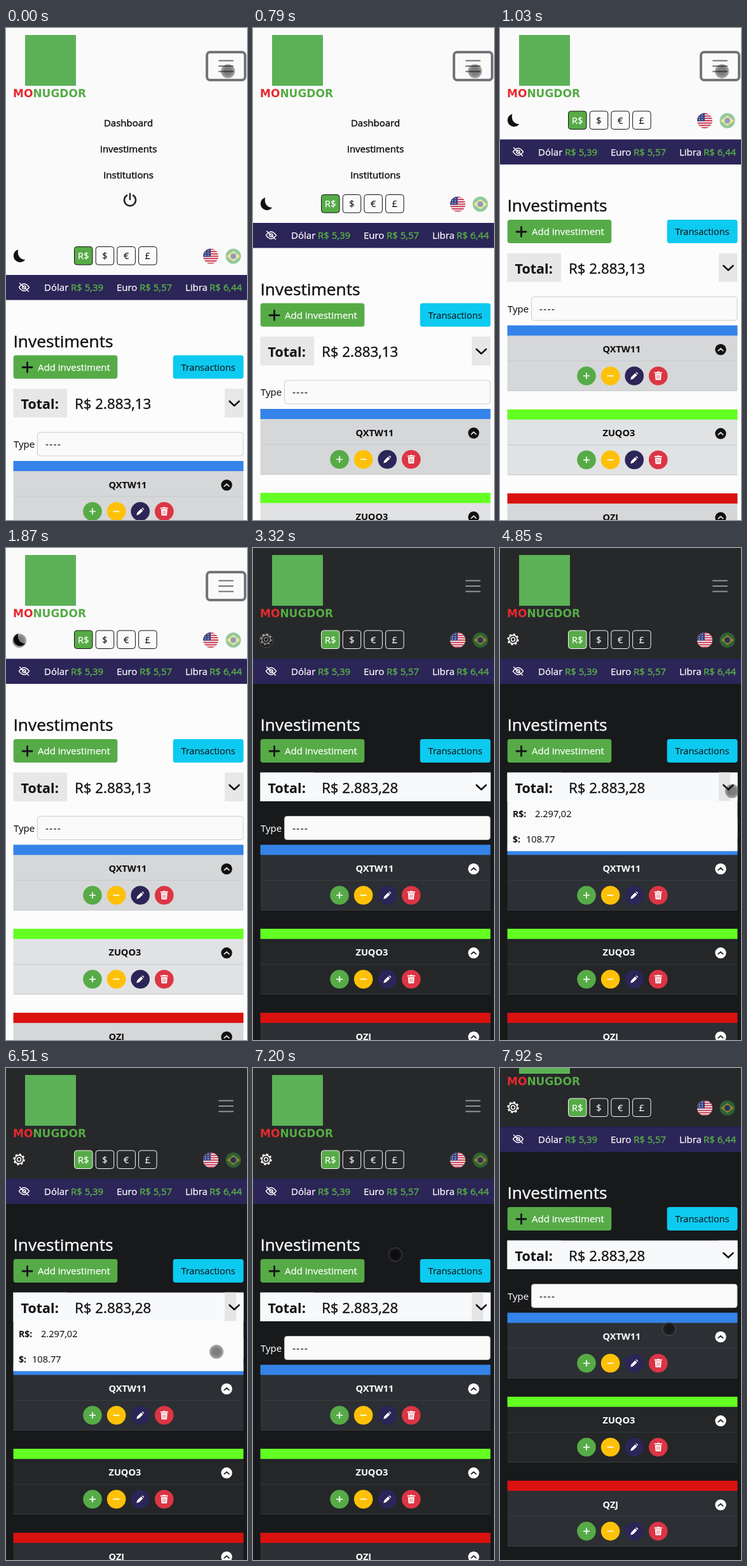
Recreate the animation shown at these times as an HTML page. Size 379 px wide and 775 px high, loop 8000 ms.

```html
<!DOCTYPE html>
<html lang="en">
<head>
<meta charset="utf-8">
<title>Wallet page</title>
<style>
html, body { margin: 0; width: 100%; height: 100%; overflow: hidden; }
svg {
  display: block; width: 379px; height: 775px;
  font: 15px "Open Sans", "Noto Sans", sans-serif;
  --bg: #fcfcfc; --nav: #fafafa; --ink: #111; --odd: #d6d7d9; --even: #e1e2e4;
  --line: #c6c8ca; --box: #e7e7e8; --amount: none; --bars: #707174; --edge: #ccc;
  --disc: #111; --mark: #e4e5e7;
  background: var(--bg);
}
svg.dark {
  --bg: #18191b; --nav: #27282a; --ink: #f8f9fa; --odd: #2c2f33; --even: #242628;
  --line: #3a3d41; --box: #f8f9fa; --amount: #f8f9fa; --bars: #939495; --edge: #bbb;
}
svg.lit { --disc: #fff; --mark: #222; }
text { --tone: var(--ink); fill: var(--tone); stroke: var(--tone); stroke-width: .1px; white-space: pre; }
.mid { text-anchor: middle; }
.med { stroke-width: .45px; }
.bold { font-weight: 700; }
.white { --tone: #fff; stroke-width: .25px; }
.black { --tone: #151618; }
.green { --tone: #56ab47; }
.stroke { fill: none; stroke-linecap: round; stroke-linejoin: round; }
.dark .light-only, svg:not(.dark) .dark-only { display: none; }
</style>
</head>
<body>
<svg id="stage" viewBox="0 0 379 775"></svg>
<script>
const GREEN = '#56ab47', NAVY = '#2c2558', YELLOW = '#ffc107', RED = '#dc3545';

const text = (x, y, s, cls = '', size = 15) =>
  `<text x="${x}" y="${y}" class="${cls}" font-size="${size}">${s}</text>`;
const rect = (x, y, w, h, fill, more = '') =>
  `<rect x="${x}" y="${y}" width="${w}" height="${h}" fill="${fill}" ${more}/>`;
const disc = (x, y, r, fill, more = '') =>
  `<circle cx="${x}" cy="${y}" r="${r}" fill="${fill}" ${more}/>`;
const line = (d, color, width, more = '') =>
  `<path class="stroke" d="${d}" stroke="${color}" stroke-width="${width}" ${more}/>`;

const header = () =>
  rect(30, 11, 80, 80, '#5cb157') +
  `<text x="11" y="108.5" style="font:bold 17px 'DejaVu Sans',sans-serif;fill:${GREEN};stroke:none"><tspan fill="#e8292e">MO</tspan>NUGDOR</text>` +
  rect(316, 38, 60, 44, 'none', 'class="light-only" rx="5" stroke="#747578" stroke-width="4"') +
  line('M335 51.5H357M335 60H357M335 68.5H357', 'var(--bars)', 2);

const menu = () =>
  ['Dashboard', 'Investiments', 'Institutions']
    .map((s, i) => text(192.5, 155 + i * 41, s, 'mid med')).join('') +
  line('M190 263.6A9 9 0 1 0 200 263.6M195 261V270', '#25262a', 2.6);

const moon = () =>
  '<path class="light-only" fill="#111" d="M19.3 134.4C17 143 22 150.5 30.2 150.2C26 155.6 19 155.6 15 151.6C9.5 146 11.5 136.6 19.3 134.4Z"/>';

const gear = () => '<g class="dark-only">' +
  disc(20.5, 144, 6.6, 'none', 'stroke="#fff" stroke-width="1.6"') +
  disc(20.5, 144, 8.2, 'none', 'stroke="#fff" stroke-width="2" stroke-dasharray="3.2 3.24"') +
  disc(20.5, 144, 3, 'none', 'stroke="#fff" stroke-width="1.5"') + '</g>';

const flags = () =>
  '<clipPath id="round"><circle cx="322" cy="145" r="12"/></clipPath><g clip-path="url(#round)">' +
  rect(310, 133, 24, 24, '#f4f0f0') +
  [0, 1, 2, 3, 4, 5, 6].map(i => rect(310, 133 + i * 3.7, 24, 1.85, '#c9304a')).join('') +
  rect(310, 133, 12, 12.9, '#3b4783') +
  [0, 1, 2, 3, 4, 5].map(i => disc(313.5 + i % 2 * 4.5, 136 + (i >> 1) * 3.7, 0.8, '#dde')).join('') +
  '</g><g opacity=".5">' + disc(357.5, 145, 12, '#2f9a45') +
  '<path d="M347 145L357.5 137L368 145L357.5 153Z" fill="#f7d32e"/>' + disc(357.5, 145, 4.5, '#24408e') + '</g>';

const currencies = () => ['R$', '$', '€', '£'].map((s, i) => {
  const x = 107.5 + i * 33.7;
  return rect(x, 130, 28.5, 28.5, i ? 'none' : GREEN, 'rx="4" stroke="var(--ink)"') +
    text(x + 14.2, 149.5, s, i ? 'mid' : 'mid white');
}).join('');

const rates = () => rect(0, 174.5, 379, 39.5, NAVY) +
  line('M20.5 194Q28.5 183 36.5 194Q28.5 205 20.5 194ZM21.5 187.5L35.5 200.5', '#fff', 1.4) +
  disc(28.5, 194, 2.6, 'none', 'stroke="#fff" stroke-width="1.4"') +
  [[60, 'Dólar', 102, '5,39'], [174, 'Euro', 210, '5,57'], [282, 'Libra', 320, '6,44']]
    .map(([x, s, vx, v]) => text(x, 199.5, s, 'white') + text(vx, 199.5, 'R$ ' + v, 'green med')).join('');

const actions = () => text(11.5, 288, 'Investiments', 'med', 26.3) +
  rect(11.7, 301, 163.6, 37, GREEN, 'rx="4"') +
  line('M26 320H41M33.5 312.5V327.5', '#151618', 2.8) + text(50, 325, 'Add investiment', 'white') +
  rect(262.7, 301, 110.8, 37, '#0dcaf0', 'rx="4"') + text(318, 325, 'Transactions', 'mid black', 14.5);

const total = () => rect(11.5, 353.7, 362, 45.3, 'var(--amount)') +
  rect(11.5, 353.7, 84.5, 45.3, 'var(--box)') + rect(344, 353.7, 29.5, 45.3, 'var(--box)') +
  `<g id="hover">${rect(344, 353.7, 18, 45.3, '#e5e5e6')}</g>` +
  text(23.5, 385.5, 'Total:', 'black bold', 21.5) +
  '<text id="sum" x="108" y="385.5" class="black med" font-size="22.3"></text>' +
  line('M351.5 373.5L359 380.5L366.5 373.5', '#111', 2.6) +
  text(12, 446.5, 'Type') +
  rect(49.5, 422.5, 323.5, 37, '#fafafa', 'rx="4" stroke="var(--edge)"') +
  '<text x="62" y="446.5" class="black" letter-spacing="1.5">----</text>';

const icons = [
  '<path d="M-5 0H5M0-5V5" stroke="#fff" stroke-width="1.7"/>',
  '<path d="M-5 0H5" stroke="#fff" stroke-width="1.7"/>',
  '<path d="M-6 6L-4.8 1.8L1.3-4.3L4.3-1.3L-1.8 4.8ZM2.2-5.2L3.5-6L6-3.5L5.2-2.2Z" fill="#fff"/>',
  '<path d="M-6-6H-2L-1.5-7H1.5L2-6H6V-4.2H-6ZM-5-3.4H5L4.2 6.5H-4.2Z" fill="#fff"/>' +
    '<path d="M-2-1.5V4.5M0-1.5V4.5M2-1.5V4.5" stroke="#dc3545" stroke-width=".7"/>'
];

const card = (name, color, i) => `<g transform="translate(0 ${i * 132.3})">` +
  rect(11.6, 467.5, 361.8, 103.5, `var(--${i % 2 ? 'even' : 'odd'})`) +
  rect(11.6, 467.5, 361.8, 16, color) +
  line('M12.5 523.5H372.5M12.5 570.5H372.5', 'var(--line)', 1) +
  text(161.5, 510, name, 'bold', 14.5) +
  disc(347, 505.5, 8.7, 'var(--disc)') + line('M343.3 507.3L347 503.8L350.7 507.3', 'var(--mark)', 1.8) +
  [GREEN, YELLOW, NAVY, RED].map((c, k) =>
    `<g transform="translate(${136 + k * 37.6} 547)">${disc(0, 0, 14.8, c)}${icons[k]}</g>`).join('') + '</g>';

const dropdown = () => '<g id="drop">' + rect(11.5, 398.5, 362, 79, '#fbfbfc') +
  text(20, 423.5, 'R$:', 'black bold', 14) + text(55, 423.5, '2.297,02', 'black', 14.6) +
  text(20, 463.5, '$:', 'black bold', 14) + text(41, 463.5, '108.77', 'black', 14.6) + '</g>';

const $ = id => document.getElementById(id);
const stage = $('stage');
stage.innerHTML =
  '<defs><radialGradient id="touch"><stop offset=".55" stop-color="#000" stop-opacity=".5"/>' +
  '<stop offset="1" stop-color="#222" stop-opacity=".38"/></radialGradient>' +
  '<clipPath id="fold"><rect id="foldBox" width="379"/></clipPath></defs>' +
  '<g id="page">' + rect(0, 0, 379, 400, 'var(--bg)') +
  '<rect id="nav" width="379" fill="var(--nav)"/>' + header() +
  `<g clip-path="url(#fold)">${menu()}</g><g id="main">` +
  moon() + gear() + currencies() + flags() + rates() + actions() + total() +
  [['QXTW11', '#3583e8'], ['ZUQO3', '#63ff22'], ['QZJ', '#d9120f']]
    .map(([name, color], i) => card(name, color, i)).join('') +
  dropdown() + '</g></g>' +
  '<g id="cursor">' + disc(0, 0, 10.8, 'url(#touch)', 'stroke="#888" stroke-opacity=".4"') + '</g>';

// Each row: start time, then the values held until the next row.
const pointer = [
  [0, 349, 68], [1150, 300, 80], [1270, 190, 106], [1390, 70, 134], [1510, 15, 146], [1630, 17, 146],
  [1870, 21, 146], [4090, 150, 230], [4220, 350, 405], [4360, 360, 391], [4480, 365, 383],
  [6510, 331, 447], [6660, 317, 363], [6810, 270, 330], [6930, 231, 303], [7080, 224, 294],
  [7320, 260, 382], [7470, 260, 487], [7620, 263, 500], [7770, 264, 455], [7920, 266, 411]
];
const folding = [[0, 214.5], [790, 132.5], [910, 30], [1030, 1], [1150, 0]];
const scrolling = [[0, 0], [7770, 37], [7920, 82]];
const at = (rows, t) => rows.findLast(r => r[0] <= t).slice(1);
const show = (id, on) => $(id).setAttribute('display', on ? 'inline' : 'none');
const move = (id, x, y) => $(id).setAttribute('transform', `translate(${x} ${y})`);

function draw(now) {
  const t = now % 8000, [open] = at(folding, t), dark = t >= 2180;
  stage.classList.toggle('dark', dark);
  stage.classList.toggle('lit', t >= 2330);
  $('sum').textContent = 'R$ 2.883,' + (dark ? 28 : 13);
  $('foldBox').setAttribute('height', 126 + open);
  $('nav').setAttribute('height', 174.5 + open);
  move('main', 0, open);
  move('page', 0, -at(scrolling, t)[0]);
  move('cursor', ...at(pointer, t));
  show('hover', t >= 4360 && t < 7770);
  show('drop', t >= 4850 && t < 7080);
}
function loop() {
  draw(performance.now());
  requestAnimationFrame(loop);
}
loop();
</script>
</body>
</html>
```
